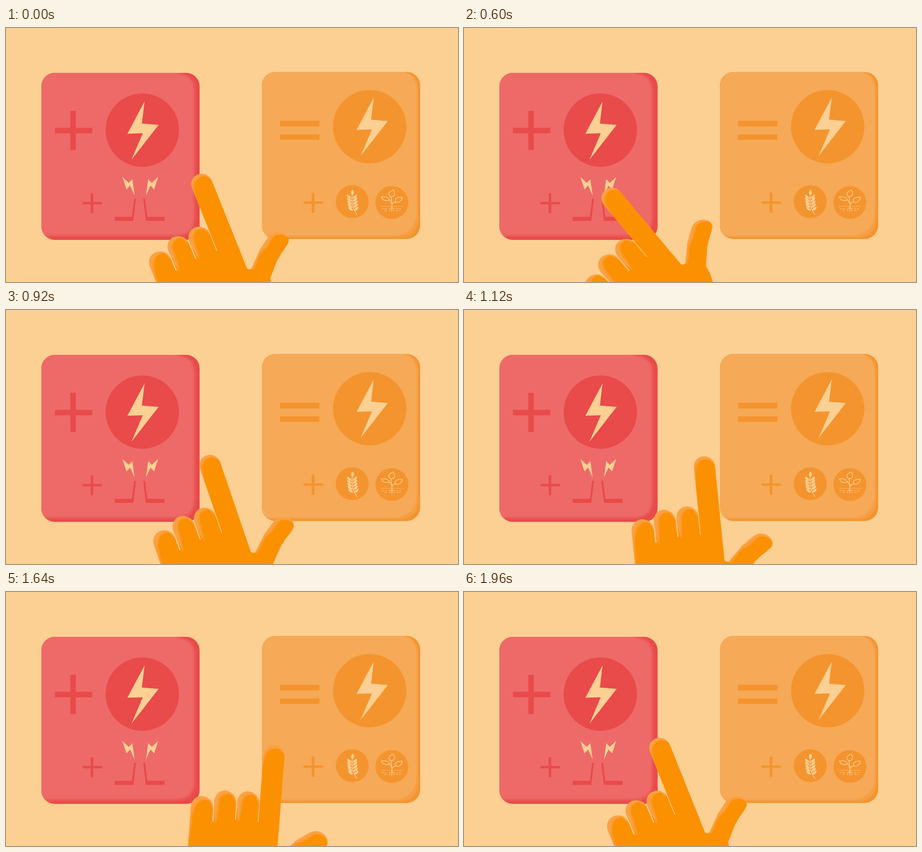
Recreate the animation shown at these times as an HTML page. Size 998 px wide and 561 px high, loop 2 s.

```html
<!DOCTYPE html>
<html lang="en">
<head>
<meta charset="utf-8">
<title>Energy sum</title>
<style>
  html, body { margin: 0; width: 100%; height: 100%; overflow: hidden; background: #fccf92; }
  svg { display: block; width: 100%; height: 100%; }
  .cream { fill: #fccf92; }
  .red { fill: #e94a4a; }
  .orange { fill: #f4942e; }
  .line { fill: none; stroke: #fccf92; stroke-width: 1.5; stroke-linecap: round; stroke-linejoin: round; }

  #hand { transform-origin: 477px 694px; animation: point 2s infinite; }

  /* swing left, sweep right, linger, return: one pose per 40 ms */
  @keyframes point {
    0%   { transform: rotate(0deg); animation-timing-function: steps(15); }
    30%  { transform: rotate(-18deg); animation-timing-function: steps(18); }
    66%  { transform: rotate(29.2deg); animation-timing-function: steps(1); }
    68%  { transform: rotate(30.8deg); animation-timing-function: steps(5); }
    78%  { transform: rotate(31deg); animation-timing-function: steps(1); }
    80%  { transform: rotate(29.6deg); animation-timing-function: steps(9); }
    98%, 100% { transform: rotate(0deg); }
  }
</style>
</head>
<body>
<svg viewBox="0 0 998 561" preserveAspectRatio="none">
  <defs>
    <filter id="soft" x="-10%" y="-10%" width="120%" height="120%"><feGaussianBlur stdDeviation="3.2"/></filter>
    <filter id="crisp" x="-10%" y="-10%" width="120%" height="120%"><feGaussianBlur stdDeviation="0.8"/></filter>
    <clipPath id="redCard"><rect x="78" y="99" width="349.5" height="369" rx="30"/></clipPath>
    <clipPath id="orangeCard"><rect x="565" y="97" width="349.5" height="369" rx="30"/></clipPath>

    <path id="bolt" d="M306 162 L268 233.500 L302 232.500 L277 291 L337 214 L300 211 Z"/>
    <path id="spark" d="M257 329 L271 342 L279 334 L284 370 L274 348 L266 356.500 Z"/>
    <path id="leg" d="M283 377 H287 L281 426 H240 V417 H278 Z"/>
    <path id="grain" d="M0 0 C1 -5 5 -8 9 -9 C10 -4 6 0 0 0 Z"/>

    <path id="outline" d="M352 612 L318 528 C311 511 322 494 339 493.500 C351 493 359 499 363 508
      L374 535 Q376.500 539 377 534 L359 494 C352 478 362 460.500 378 460 C390 459.500 399 465 403 474
      L417.500 509 Q420 512 420 508 L405.500 474 C398 457 408 440 425 439 C437 438.500 446 445 449 453
      L464.500 491.500 Q466 494.500 466.500 491.500 L411 354 C404 338 416 322 432 322 C443 322 451 328 455 339
      L532 531 Q537 535 542 531 L557 498 Q559 490 565 483 C577 465 583 451 600 451
      C614 451 626 460 624 472 C620 483 607 496 602 508 L599 512 L583 553
      Q587 566 587 576 V590 L600 740 H400 Z"/>
    <path id="inside" d="M358 625 L337 562 C327 537 326 521 330 511 C334 502 342 497 350 498 L366 512
      L384 539 C386 534 373 499 370 488 C367 475 374 465 388 464 L406 478
      L426 512 C432 510 417 476 416 466 C414 453 421 444 435 443 L452 458
      L466 493 L423 384 L417 357 C413 343 423 329 438 327 L458 335
      L533 531 L545 534 C551 530 553 522 557 512 C562 498 567 494 573 488
      C580 483 584 470 592 461 C602 453 618 456 626 467 V480 L606 508
      L584 553 L592 570 V590 L600 740 H400 Z"/>
    <clipPath id="handClip"><use href="#outline"/></clipPath>
  </defs>

  <rect class="cream" width="998" height="561"/>

  <g clip-path="url(#redCard)">
    <rect class="red" x="78" y="99" width="350" height="370"/>
    <path fill="#ed6a67" filter="url(#soft)" d="M50 70 H378 V100 Q416 103 416 138 V418 Q416 459 375 459 H50 Z"/>
  </g>
  <g class="red">
    <path d="M142 183 H154 V269.500 H142 Z M108 220.500 H190.500 V232.500 H108 Z"/>
    <circle cx="301" cy="225.500" r="81"/>
    <path d="M187 365 H192.500 V409 H187 Z M169 384.300 H212 V389.500 H169 Z"/>
    <use href="#leg"/>
    <use href="#leg" transform="translate(590) scale(-1 1)"/>
  </g>
  <g class="cream">
    <use href="#bolt"/>
    <use href="#spark"/>
    <use href="#spark" transform="translate(593) scale(-1 1)"/>
  </g>

  <g clip-path="url(#orangeCard)">
    <rect class="orange" x="565" y="97" width="350" height="370"/>
    <path fill="#f59f45" filter="url(#crisp)" d="M540 70 H882 V97 Q910 104 910 136 V422 Q908 462 868 462 H540 Z"/>
    <path fill="#f6a957" filter="url(#crisp)" d="M540 70 H878 V97 Q907 106 907 140 V408 Q904 459 850 459 H540 Z"/>
  </g>
  <g class="orange">
    <path d="M605 205 H692 V217.500 H605 Z M605 235 H692 V247 H605 Z"/>
    <circle cx="803" cy="218" r="81"/>
    <path d="M675 363.500 H681 V408 H675 Z M657 383 H700 V388.300 H657 Z"/>
    <circle cx="764.500" cy="383.500" r="36.300"/>
    <circle cx="852" cy="385.500" r="36.300"/>
  </g>
  <use class="cream" href="#bolt" transform="translate(506 -8.500)"/>

  <path class="line" d="M765 364 C762 385 765 400 775 412"/>
  <path class="cream" d="M765 357 C770 361 769 366 765 369 C760 366 761 361 765 357 Z"/>
  <g id="grains" class="cream"></g>

  <g class="line">
    <path d="M852 405 V388 L850 373 M852 390 Q850 382 846 379 M852 392 Q853 386 860 384"/>
    <path d="M847 380 C838 383 831 380 829 373 C838 372 845 374 847 380 Z"/>
    <path d="M850 373 C841 368 846 361 855 358 C861 366 858 372 850 373 Z"/>
    <path d="M860 384 C858 376 865 373 875 374 C873 383 867 387 860 384 Z"/>
    <path d="M852 396 L847 400 V404 M852 396 L857 400 V404" stroke-width="1.2"/>
    <path d="M828 394 H877" stroke-width="1" stroke-dasharray="1 2"/>
    <path d="M830 399 H844 M861 399 H875 M836 403 H843 M862 403 H870" stroke-width="1.2" stroke-dasharray="4 3"/>
  </g>

  <g id="hand">
    <use href="#outline" fill="#fba142"/>
    <g clip-path="url(#handClip)">
      <use href="#inside" fill="#f99a2c" transform="translate(-4 0)"/>
      <use href="#inside" fill="#fb9000"/>
    </g>
  </g>
</svg>
<script>
  // Paired grains along the ear of wheat
  const grains = [0, 1, 2, 3, 4].flatMap(i => {
    const x = 764 + i * i * 0.2, y = 377 + i * 6.6;
    return [1, -1].map(s =>
      `<use href="#grain" transform="translate(${x + s} ${y}) scale(${s * 1.1} 1)"/>`);
  });
  document.getElementById('grains').innerHTML = grains.join('');
</script>
</body>
</html>
```
